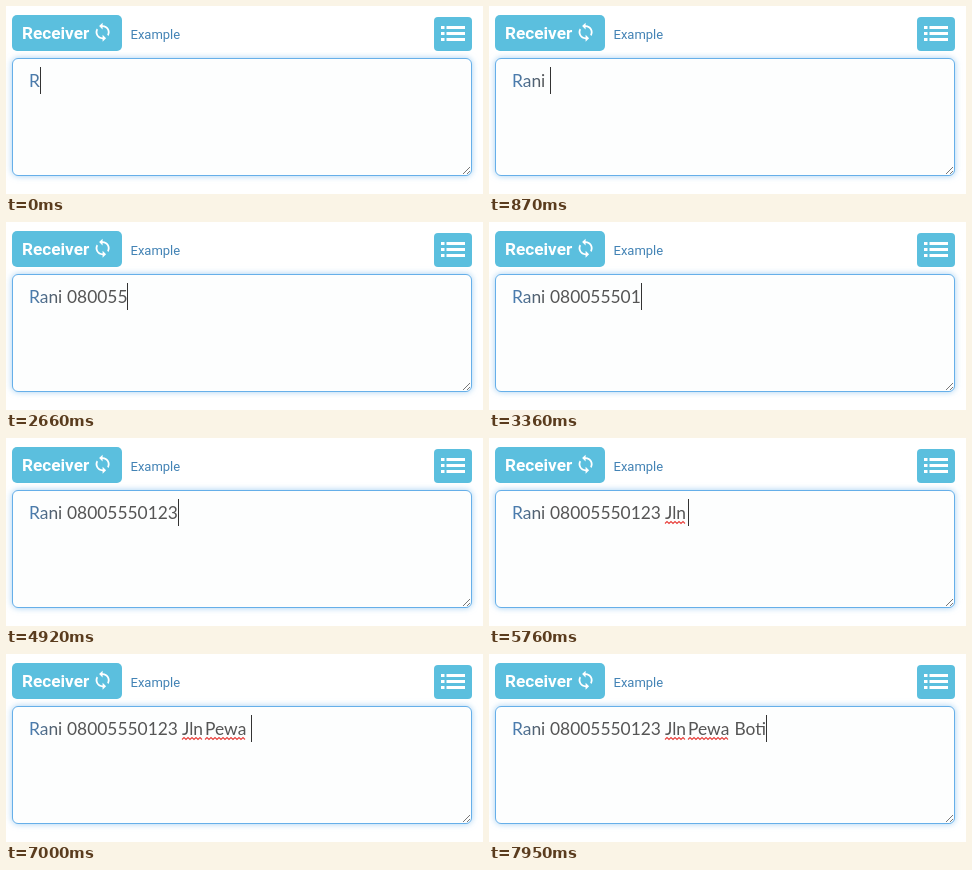
An HTML page that plays this animation: 477x188 px, repeating every 8000 ms.

```html
<!DOCTYPE html>
<html lang="id">
<head>
<meta charset="utf-8">
<title>Receiver form</title>
<style>
  html, body { margin: 0; width: 100%; height: 100%; overflow: hidden; background: #fff; }
  svg { display: block; width: 477px; height: 188px; }
  text { font-family: Roboto, "Open Sans", sans-serif; white-space: pre; }
  .label { font-size: 17.2px; font-weight: 700; fill: #fff; }
  .link { font-size: 13px; fill: #4383b5; }
  .typed text { font-family: Lato, Roboto, sans-serif; font-size: 17.4px; fill: #555; }
  .typed text:first-child { fill: url(#tint); }
  .button { fill: #5bbfde; }
  .field { fill: #fdfefe; stroke: #66afe9; filter: drop-shadow(0 0 3px rgba(102, 175, 233, .6)); }
  .grip { stroke: #777; fill: none; }
  .wave { stroke: #e8403c; stroke-width: 1.1; fill: none; }
</style>
</head>
<body>
<svg viewBox="0 0 477 188">
  <defs>
    <linearGradient id="tint" gradientUnits="userSpaceOnUse" x1="26" x2="56" y1="0" y2="0">
      <stop offset="0" stop-color="#4a7db0"/>
      <stop offset="1" stop-color="#555"/>
    </linearGradient>
  </defs>

  <rect class="button" x="6" y="9" width="110" height="36" rx="5"/>
  <text class="label" x="16" y="33">Receiver</text>
  <path fill="#fff" transform="translate(96.6 26.2) scale(.87) translate(-12 -12)"
    d="M12 4V1L8 5l4 4V6a6 6 0 0 1 5.3 8.8l1.46 1.46A8 8 0 0 0 12 4zM12 18a6 6 0 0 1-5.3-8.8L5.24 7.74A8 8 0 0 0 12 20v3l4-4-4-4z"/>
  <text class="link" x="124.5" y="33">Example</text>

  <rect class="button" x="428" y="11" width="38" height="34" rx="4"/>
  <path stroke="#fff" stroke-width="3" d="M435 21.5h3.5m2 0H459M435 27.5h3.5m2 0H459M435 33.5h3.5m2 0H459"/>

  <rect class="field" x="6.5" y="52.5" width="459" height="117" rx="5.5"/>
  <path class="grip" d="M457 168l7-7M461 168l3-3"/>

  <g class="typed" id="typed"></g>
  <rect id="caret" y="61" width="1" height="27" fill="#333"/>
</svg>

<script>
const LOOP = 8000;
const BASELINE = 81;
const WORDS = [
  { text: 'Rani', x: 23 },
  { text: '08005550123', x: 61 },
  { text: 'Jln', x: 176, wave: true },
  { text: 'Pewa', x: 199, wave: true },
  { text: 'Boti', x: 245.5 }
];
// One time per character typed after the first.
const KEYS = [
  250, 370, 490, 870,
  1650, 2030, 2110, 2280, 2450, 2620, 2790, 2960, 3360, 3670, 3820, 4990,
  5300, 5450, 5610, 5760,
  6080, 6390, 6710, 6850, 7000,
  7320, 7650, 7800, 7950
];
const CARET_OFF = [[1420, 1650], [4370, 4920]];

const caret = document.getElementById('caret');
const typed = document.getElementById('typed');

function add(tag, attrs) {
  const el = document.createElementNS('http://www.w3.org/2000/svg', tag);
  for (const name in attrs) el.setAttribute(name, attrs[name]);
  return typed.appendChild(el);
}

function wavePath(x, width) {
  let d = `M${x} 85.5`;
  for (let i = 1; i * 2 <= width; i++) d += `L${x + i * 2} ${i % 2 ? 83.5 : 85.5}`;
  return d;
}

let start = 0;
for (const word of WORDS) {
  word.start = start;
  start += word.text.length + 1;
  word.el = add('text', { x: word.x, y: BASELINE });
}
for (const word of WORDS.filter(w => w.wave)) {
  word.el.textContent = word.text;
  word.line = add('path', { class: 'wave', d: wavePath(word.x, word.el.getComputedTextLength() - 1) });
}

function render(t) {
  const count = 1 + KEYS.filter(k => k <= t).length;
  let x = 0;
  for (const word of WORDS) {
    const n = Math.max(0, count - word.start);
    word.el.textContent = word.text.slice(0, n);
    if (word.line) word.line.style.display = n > word.text.length ? '' : 'none';
    if (count >= word.start) x = word.x + (n ? word.el.getComputedTextLength() : 0);
  }
  caret.setAttribute('x', Math.floor(x + 0.4));
  caret.style.display = CARET_OFF.some(([a, b]) => t >= a && t < b) ? 'none' : '';
}

let origin;
function tick(now) {
  origin ??= now;
  render((now - origin) % LOOP);
  requestAnimationFrame(tick);
}
render(0);
requestAnimationFrame(tick);
</script>
</body>
</html>
```
